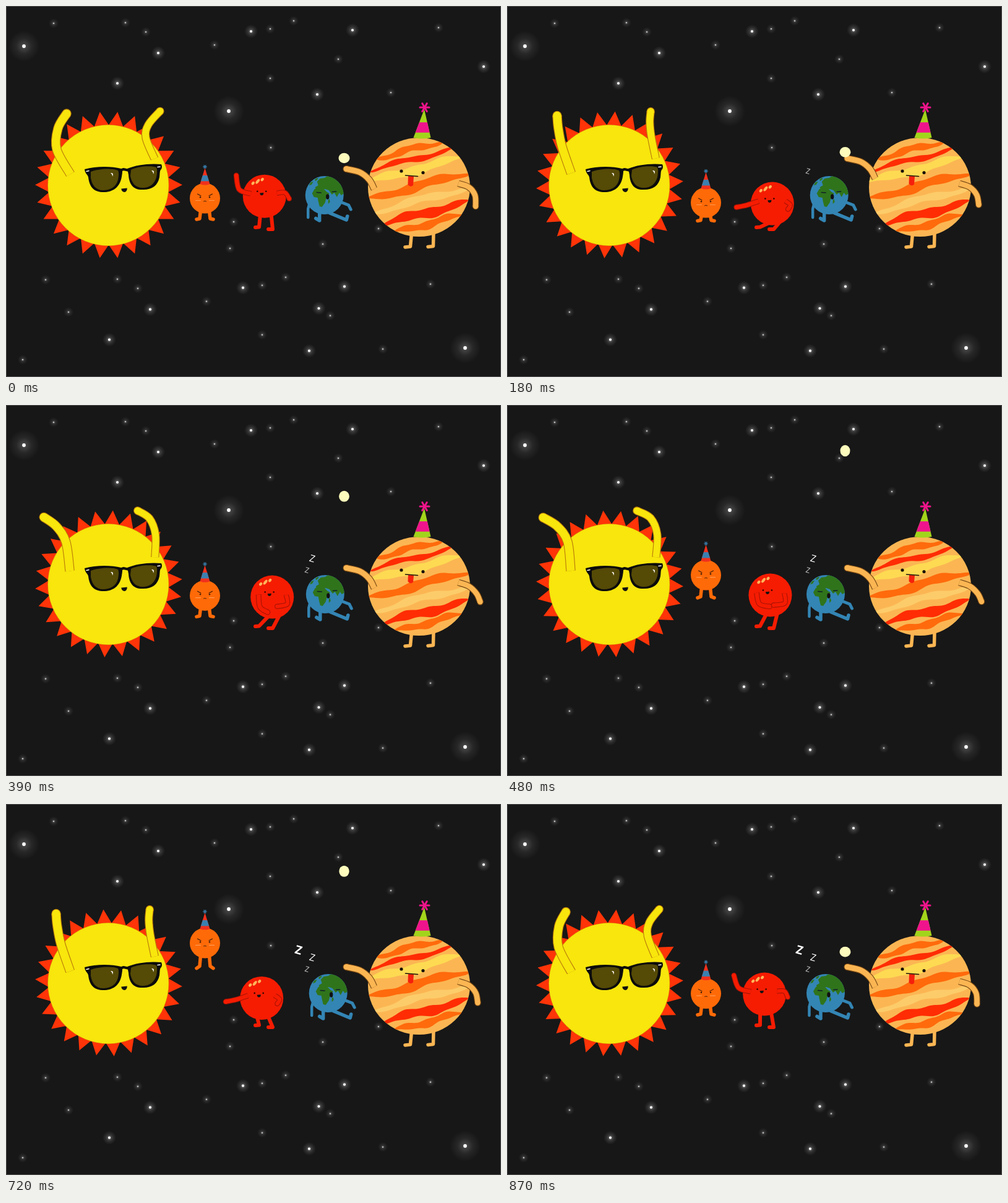
An HTML page with a canvas for the animation above (900 ms loop, 800 by 600 pixels).

```html
<!DOCTYPE html>
<html lang="en">
<head>
<meta charset="utf-8">
<title>Planet party</title>
<style>
html, body { margin: 0; width: 100%; height: 100%; overflow: hidden; background: #171717; }
canvas { display: block; }
</style>
</head>
<body>
<canvas id="stage" width="800" height="600"></canvas>
<script>
const ctx = document.getElementById('stage').getContext('2d');
const LOOP = 900, STEP = 30, TAU = Math.PI * 2;

// Motion rules
const clamp = s => Math.max(0, Math.min(1, s));
const smooth = s => (s = clamp(s)) * s * (3 - 2 * s);
const mix = (from, to, u) => from.map((v, i) => v + (to[i] - v) * u);

function motionAt(t) {
  return {
    angle: TAU * t / LOOP,
    swing: 1 - Math.abs(1 - 2 * t / LOOP),
    crouch: t < 360 ? Math.sin(Math.PI * t / 360) : 0,
    hop: smooth((t - 360) / 300) * (1 - smooth((t - 660) / 240)),
    toss: clamp(t / 470) ** 3 - clamp((t - 500) / 375) ** 3
  };
}

// Drawing helpers
function oval(x, y, rx, ry, fill, turn = 0) {
  ctx.beginPath();
  ctx.ellipse(x, y, rx, ry, turn, 0, TAU);
  ctx.fillStyle = fill;
  ctx.fill();
}
const disc = (x, y, r, fill) => oval(x, y, r, r, fill);

function line(points, width, color) {
  ctx.beginPath();
  for (let i = 0; i < points.length; i += 2) ctx.lineTo(points[i], points[i + 1]);
  ctx.lineWidth = width;
  ctx.strokeStyle = color;
  ctx.lineCap = ctx.lineJoin = 'round';
  ctx.stroke();
}

function shape(d, fill) {
  ctx.fillStyle = fill;
  ctx.fill(new Path2D(d));
}

function smile(x, y, w, h) {
  ctx.beginPath();
  ctx.ellipse(x, y, w / 2, h, -.08, 0, Math.PI);
  ctx.fillStyle = '#111';
  ctx.fill();
}

// A smooth path through all points.
function curve(p) {
  const n = p.length / 2;
  const at = (i, c) => p[2 * Math.max(0, Math.min(n - 1, i)) + c];
  const path = new Path2D();
  path.moveTo(p[0], p[1]);
  for (let i = 0; i < n - 1; i++) {
    const out = c => at(i, c) + (at(i + 1, c) - at(i - 1, c)) / 6;
    const into = c => at(i + 1, c) - (at(i + 2, c) - at(i, c)) / 6;
    path.bezierCurveTo(out(0), out(1), into(0), into(1), at(i + 1, 0), at(i + 1, 1));
  }
  return path;
}

// An arm: round outlined hand first, open at the shoulder.
function arm(points, width, fill, outline) {
  const path = curve(points);
  ctx.lineCap = 'butt';
  ctx.lineJoin = 'round';
  for (const [w, color] of [[width + 2.2, outline], [width, fill]]) {
    ctx.lineWidth = w;
    ctx.strokeStyle = color;
    ctx.stroke(path);
    disc(points[0], points[1], w / 2, color);
  }
}

function hat(x, tip, height, half, lean, base, stripe) {
  ctx.save();
  ctx.beginPath();
  ctx.moveTo(x, tip);
  ctx.lineTo(x + half - lean, tip + height);
  ctx.quadraticCurveTo(x - lean, tip + height + 3, x - half - lean, tip + height);
  ctx.clip();
  ctx.fillStyle = base;
  ctx.fillRect(x - 30, tip, 60, height + 3);
  ctx.fillStyle = stripe;
  ctx.fillRect(x - 30, tip + height * .46, 60, height * .36);
  ctx.restore();
}

function pompom(x, y, r, width, color) {
  for (let k = 0; k < 3; k++) {
    const a = k * Math.PI / 3, dx = r * Math.cos(a), dy = r * Math.sin(a);
    line([x - dx, y - dy, x + dx, y + dy], width, color);
  }
}

// Star sizes: 0 small, 1 medium, 2 large. The cluster appears twice.
const CLUSTER = [
  [77, 28, 0], [193, 27, 0], [226, 42, 0], [246, 76, 1], [337, 63, 0],
  [396, 41, 1], [427, 37, 0], [465, 24, 0], [560, 39, 1], [537, 86, 0],
  [427, 117, 0], [180, 125, 1], [503, 143, 1], [622, 140, 0], [699, 35, 0]
];
const STARS = [
  ...CLUSTER,
  ...CLUSTER.map(([x, y, size]) => [x - 13, y + 414.7, size]),
  [29, 65, 2], [360, 170, 2], [742, 553, 2], [772, 98, 1], [505.5, 489, 1],
  [428, 229, 0], [368, 349, 0], [362, 392, 0], [602, 360, 0], [512, 385, 0],
  [101, 495, 0], [27, 572, 0]
];

function drawSky() {
  ctx.fillStyle = '#171717';
  ctx.fillRect(0, 0, 800, 600);
  for (const [x, y, size] of STARS) {
    const halo = [8, 11, 25][size], alpha = size === 1 ? .36 : .24;
    const glow = ctx.createRadialGradient(x, y, 0, x, y, halo);
    glow.addColorStop(0, `rgba(255,255,255,${alpha})`);
    glow.addColorStop(.5, `rgba(255,255,255,${alpha * .3})`);
    glow.addColorStop(1, 'rgba(255,255,255,0)');
    disc(x, y, halo, glow);
    disc(x, y, 1.3 + size * .8, size ? '#fff' : '#bbb');
  }
  ctx.strokeStyle = '#505050';
  ctx.lineWidth = 1;
  ctx.strokeRect(.5, .5, 799, 599);
}

function drawSun({ angle, swing }) {
  const rays = 26, yellow = '#f8e60c', outline = '#b8790a';
  ctx.beginPath();
  for (let i = 0; i < rays * 2; i++) {
    // The crown advances by four rays per loop.
    const a = (i * Math.PI + 4 * angle) / rays, r = i % 2 ? 97 : 119;
    ctx.lineTo(166 + r * Math.cos(a), 289.3 + r * Math.sin(a));
  }
  ctx.fillStyle = '#ff3408';
  ctx.fill();
  disc(165.3, 290, 98, '#d98a08');
  disc(165.3, 290, 97.4, yellow);
  arm(mix([98, 174, 84, 198, 82, 232, 104, 272], [55.5, 182.5, 81, 196, 99, 220, 103, 268], swing),
    13.2, yellow, outline);
  arm(mix([249, 170, 230, 192, 226, 213, 240, 247], [207, 171, 232, 182, 244, 209, 241, 246], swing),
    11, yellow, outline);

  const rim = '#0b0b0b', lens = '#554a06';
  shape('M127 264C145 259 170 259 186 263C189 265 188 270 187 276C184 294 172 301 158 301C142 301 135 293 133 277C132 272 128 272 127 264Z', rim);
  shape('M196 263C210 257 232 254 251 256Q253 260 251 264C248 266 249 270 248 277C245 291 236 297 222 297C206 298 199 289 198 273Z', rim);
  line([184, 266, 190, 264, 199, 266], 4, rim);
  shape('M137 268C150 263 172 262 181 266C183 270 182 276 181 281C178 293 168 298 157 298C145 298 139 290 137 278Z', lens);
  shape('M202 265C213 259 236 258 243 261C245 265 244 272 243 277C240 288 232 294 221 294C209 294 203 286 201 275Z', lens);
  for (const [x, y] of [[169, 270], [235, 266]]) shape(`M${x} ${y}q6-1 3 6q0-4-3-6Z`, '#fff');
  line([130, 267.5, 134, 266.5], 1.5, '#fff');
  line([245, 260.5, 249, 260], 1.5, '#fff');
  smile(191, 295, 9.5, 6);
}

function drawMercury({ crouch, hop }) {
  const x = 321.5, y = 311 + 7 * crouch - 102 * hop;
  const orange = '#ff6a08', blue = '#3a80b0', dark = '#3a1a08';
  const sole = y + 33 - 4.5 * crouch + 5 * hop;
  for (const side of [-1, 1]) {
    const ankle = x + side * 8.5;
    line([x + side * 7, y + 20, ankle, sole, ankle + side * 5, sole + 1 + 3 * hop], 5.5, orange);
  }
  disc(x, y, 24.5, orange);
  hat(x, y - 49, 26, 8, 0, '#f0301c', blue);
  pompom(x, y - 51, 2.8, 1.3, blue);
  for (const side of [-1, 1]) {
    line([x + side * 12, y - 7, x + side * 6.5, y - 4], 1.1, dark);
    disc(x + side * 7.5, y - 1.8, 1.2, dark);
    line([x + side * 7, y + 3.5, x + side * 15, y + 3.5], 1.2, '#ff9a50');
  }
  line([x - 2, y + 5, x, y + 4.3, x + 2, y + 5], 1, dark);
}

function drawVenus({ angle, swing }) {
  const red = '#f51c02', outline = '#a81405';
  const x = 422.5 + 9.5 * Math.sin(angle - TAU / 12);
  const y = 312.7 - 5 * Math.cos(2 * angle) + 3 * Math.sin(angle);
  line([x - 7, y + 32, 409, 357.5, 403, 358], 6, red);
  line([x + 11, y + 31, 431, 361, 424, 361], 6, red);
  disc(x, y, 35, red);
  for (let k = 0; k < 3; k++)
    oval(x - 18.5 + 7.5 * k, y - 21 - 3 * k, k === 1 ? 4.6 : 3, 2.2, '#ffb45a', -.9);
  disc(x - 11.5, y - 8, 1.3, '#2a0600');
  disc(x + 2.5, y - 8, 1.3, '#2a0600');
  smile(x - 4.5, y - 5.5, 6, 4);

  // The left arm turns about its shoulder, its elbow sagging at both ends.
  const turn = -.9 + 3.5 * swing ** 1.2, reach = 38 - 9 * swing ** 3;
  const sag = Math.abs(2 * swing - 1), sx = x - 22, sy = y - 4;
  const dx = -reach * Math.cos(turn), dy = reach * Math.sin(turn);
  arm([sx + dx, sy + dy, sx + dx / 2 - 7 * sag, sy + dy / 2 + 8 * sag, sx, sy], 6.5, red, outline);
  const right = mix([40, 4, 33, -6, 20, -5], [3, 17, 23, 14, 23, -3], swing);
  arm(right.map((v, i) => v + (i % 2 ? y : x)), 6, red, outline);
}

function drawEarth({ angle }) {
  const blue = '#3385b4', green = '#2f741b';
  ctx.save();
  ctx.translate(518 - 3.3 * Math.cos(2 * angle), 306);
  line([-24, 12, -26.5, 22, -26.5, 36], 4.5, blue);
  line([-8, 28, -8, 41, -14, 37.5], 5.5, blue);
  line([9, 29, 35.5, 40, 37, 34], 5.5, blue);
  line([26, 11, 39, 16, 42.5, 23], 5, blue);
  disc(0, 0, 31, blue);
  ctx.save();
  ctx.beginPath();
  ctx.arc(0, 0, 31, 0, TAU);
  ctx.clip();
  shape('M-12-22L-7-27L0-28L5-31L14-30C24-26 31-15 32-3L27 0L24-4L20 3L16-4L12-1L7-8L1-10L-4-8L-8-11L-14-9L-15-13L-10-16Z', green);
  shape('M-16-10L-9-12L0-9L4-5L8-3L3 4L1 12L-4 19L-8 18L-10 10L-11 4L-17 3L-20-3Z', green);
  shape('M6 8l2-2l1 5l-3 3ZM-25-16l3-5l4-1l-3 5ZM-16-25l4-3l2 1l-4 4Z', green);
  ctx.restore();
  line([-12.5, -4.5, -5.5, -4], 1.4, '#10202a');
  line([12.5, -5.5, 19, -6], 1.4, '#10202a');
  oval(5, 2.5, 2.7, 4.2, '#111');
  ctx.restore();
}

function drawSnores(t) {
  ctx.textAlign = 'center';
  [[486.5, 267], [495, 248], [473, 236]].forEach(([x, y], k) => {
    if (t < 150 + 210 * k) return;
    const size = 12 + 3.5 * k;
    ctx.save();
    ctx.translate(x, y);
    ctx.rotate(.28);
    ctx.font = `${k === 2 ? 700 : 400} ${size}px "Open Sans", sans-serif`;
    ctx.fillStyle = k ? '#fff' : '#ccc';
    ctx.fillText('Z', 0, size * .36);
    ctx.restore();
  });
}

// A tapered, wavy chord of the unit-free disc of radius 82.
function band(color, offset, thick, phase) {
  const half = Math.sqrt(82 ** 2 - offset ** 2) + 3;
  const edge = side => {
    for (let i = 0; i <= 40; i++) {
      const s = (side < 0 ? i : 40 - i) / 40;
      const bulge = Math.sin(Math.PI * s) ** .5 * (1 + .2 * Math.sin(s * 21 + phase));
      ctx.lineTo(half * (2 * s - 1), offset + 2.5 * Math.sin(s * 9 + phase) + side * thick / 2 * bulge);
    }
  };
  ctx.beginPath();
  edge(-1);
  edge(1);
  ctx.fillStyle = color;
  ctx.fill();
}

function drawJupiter({ swing, crouch }) {
  const peach = '#fbb653', outline = '#7a4a14', dark = '#1a1008';
  const red = '#ff2c04', orange = '#ff6a0c', yellow = '#fdda52', pale = '#fdcc6a';
  line([655.5, 368, 653.5, 389, 645, 390], 5.5, peach);
  line([691, 366, 690.5, 388.5, 682, 389.5], 5.5, peach);
  ctx.save();
  ctx.beginPath();
  ctx.ellipse(667.5, 293, 82.5, 80, 0, 0, TAU);
  ctx.fillStyle = peach;
  ctx.fill();
  ctx.clip();
  ctx.translate(667.5, 293);
  ctx.rotate(-.255);
  const bands = [[orange, -62, 11], [red, -46, 9], [yellow, -29, 15], [orange, -2, 15],
    [pale, 21, 12], [red, 43, 15], [orange, 61, 12]];
  bands.forEach(([color, offset, thick], k) => band(color, offset, thick, k * 1.7));
  ctx.restore();

  hat(676, 167, 46, 14, 3.5, '#a2d41c', '#f0148c');
  pompom(676.5, 164, 7.5, 3, '#f0148c');
  disc(639, 267, 2.6, dark);
  disc(674, 269.5, 2.6, dark);
  const tip = 292 - 4 * swing;
  shape(`M650 275L659 275.5L658 ${tip - 2}Q654 ${tip + 2} 649.5 ${tip - 3}Z`, '#f5200c');
  line([645.5, 274, 665.5, 275.5], 1.6, dark);

  const lift = 17 * crouch;
  arm([550, 263.5 - lift, 572, 269 - lift, 587, 281 - lift, 595, 296 - lift], 9, peach, outline);
  arm(mix([759, 324, 758, 306, 748, 293, 731, 287], [767.5, 317.5, 761, 305, 748, 293, 731, 287], swing),
    8.5, peach, outline);
}

function drawBall({ toss }) {
  oval(546.5, 246 - 172 * toss, 9 - toss, 8.3 + toss, '#fdfcbc');
}

function frame() {
  const t = Math.floor((performance.now() + 1) / STEP) * STEP % LOOP;
  const motion = motionAt(t);
  drawSky();
  drawSun(motion);
  drawMercury(motion);
  drawVenus(motion);
  drawEarth(motion);
  drawSnores(t);
  drawJupiter(motion);
  drawBall(motion);
  requestAnimationFrame(frame);
}
frame();
</script>
</body>
</html>
```
